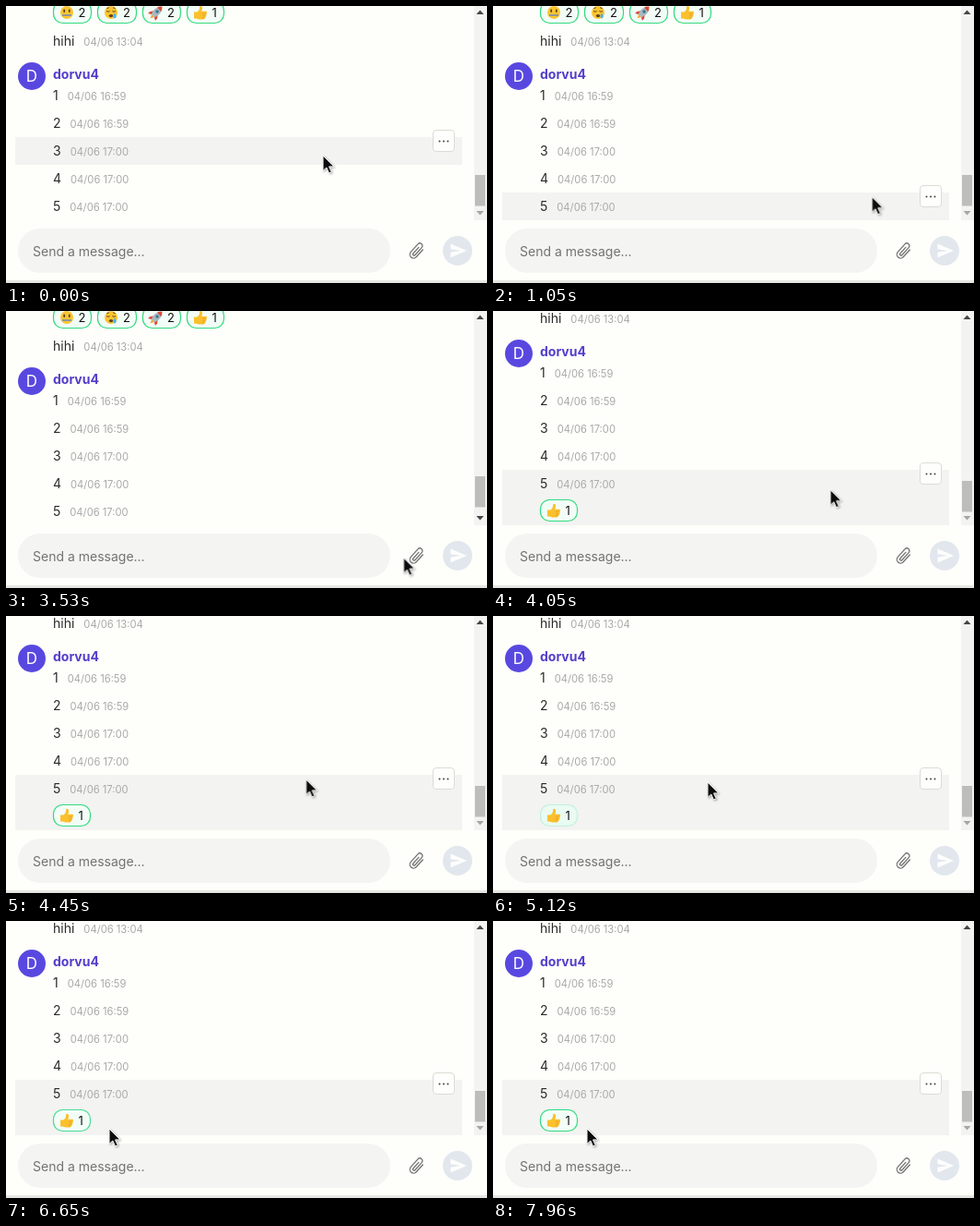
Recreate the animation shown at these times as an HTML page. Size 522 px wide and 300 px high, loop 8 s.

```html
<!DOCTYPE html>
<html lang="en">
<head>
<meta charset="utf-8">
<title>Chat reaction</title>
<style>
html, body { margin: 0; width: 100%; height: 100%; overflow: hidden; background: #fefefa; }
svg { display: block; }
#stage { width: 522px; height: 300px; font: 14px Inter, sans-serif; fill: #2b2b2b; }
.time { font-size: 11.2px; fill: #a9a9a8; }
.name { font-weight: 700; fill: #533ecb; }
.count, .item { font-size: 13px; fill: #111; }
.chip { fill: #f3fdf7; stroke: #33da80; stroke-width: 1.2; }
.hover { fill: #f3f3f1; }
.button { fill: #fefefc; stroke: #dcdcd4; }

.row3, .row4, .row5, .menu, .hand, .arrow, .scroll, .thumb, .down, .fresh, .cursor {
  animation: 8s linear infinite;
}
.row3, .row4, .row5, .hand, .arrow, .thumb, .down { animation-timing-function: step-end; }
.row3 { animation-name: row3; }
.row4 { animation-name: row4; }
.row5 { animation-name: row5; }
.menu { animation-name: menu; }
.hand { animation-name: hand; }
.arrow { animation-name: arrow; }
.scroll { animation-name: scroll; }
.thumb { animation-name: thumb; }
.down { animation-name: down; }
.fresh { animation-name: fresh; }
.cursor { animation-name: cursor; }

@keyframes row3 { 0% { opacity: 1 } 8.9%, 100% { opacity: 0 } }
@keyframes row4 { 0% { opacity: 0 } 8.9% { opacity: 1 } 12.6%, 100% { opacity: 0 } }
@keyframes row5 { 0% { opacity: 0 } 12.6% { opacity: 1 } 39.1% { opacity: 0 } 46%, 100% { opacity: 1 } }
@keyframes menu { 0%, 23.7% { opacity: 0 } 25%, 39.1% { opacity: 1 } 39.11%, 100% { opacity: 0 } }
@keyframes hand { 0% { opacity: 0 } 17.5% { opacity: 1 } 39.1%, 100% { opacity: 0 } }
@keyframes arrow { 0% { opacity: 1 } 17.5% { opacity: 0 } 39.1%, 100% { opacity: 1 } }
@keyframes scroll {
  0%, 48.1% { transform: translateY(0) }
  50%, 100% { transform: translateY(-30px) }
}
@keyframes thumb {
  0% { transform: translateY(183px) }
  41.2% { transform: translateY(179px) }
  49.2%, 100% { transform: translateY(184px) }
}
@keyframes down { 0% { fill: #a6a6a4 } 41.2% { fill: #454545 } 50%, 100% { fill: #a6a6a4 } }
@keyframes fresh {
  0%, 56% { fill: #f3fdf7; stroke: #33da80 }
  64% { fill: #e9fbf2; stroke: #bff1dc }
  83.1% { fill: #f3fdf7; stroke: #48dc96 }
  88.6%, 100% { fill: #f3fdf7; stroke: #33da80 }
}
@keyframes cursor {
  0%, 7.6% { transform: translate(344px, 162px) }
  10.6% { transform: translate(375px, 185px) }
  13.75% { transform: translate(420px, 212px) }
  16.9% { transform: translate(462px, 213px) }
  19.5%, 28.87% { transform: translate(472px, 210px) }
  31.3% { transform: translate(454px, 244px) }
  33.87%, 43.1% { transform: translate(430px, 269px) }
  44.1% { transform: translate(432px, 268px) }
  46.9% { transform: translate(392px, 213px) }
  53.1% { transform: translate(349px, 181px) }
  55.6% { transform: translate(326px, 177px) }
  64% { transform: translate(233px, 180px) }
  73.5% { transform: translate(140px, 209px) }
  78.8% { transform: translate(118px, 222px) }
  83.1%, 84.4% { transform: translate(112px, 225px) }
  88.6%, 98.6% { transform: translate(109px, 230px) }
  99.5%, 100% { transform: translate(102px, 225px) }
}
</style>
</head>
<body>
<svg id="stage" viewBox="0 0 522 300">
  <defs>
    <g id="zip">
      <circle r="7" fill="#fbc530"/>
      <path d="M-2.800-2.500v1.500M2.800-2.500v1.500" stroke="#5d4225" stroke-width="1.800" stroke-linecap="round"/>
      <path d="M-5 3H5" stroke="#858b8f" stroke-width="2"/>
      <path d="M-4.500 3H5" stroke="#c9cccb" stroke-width=".7" stroke-dasharray="1"/>
    </g>
    <g id="tear">
      <circle r="7" fill="#fbc530"/>
      <path d="M-5-1.500q2 1.500 3.600 0M1.400-1.500q2 1.500 3.600 0M-4.600-4.400l2.400-.9M4.600-4.400l-2.400-.9" fill="none" stroke="#5d4225"/>
      <ellipse cy="3.600" rx="2.200" ry="1.600" fill="#5d4225"/>
      <path d="M4 .5q3.400 5 0 6q-3-1 0-6" fill="#45b4ee"/>
    </g>
    <g id="rocket" transform="rotate(45)">
      <path d="M-2 5h4L0 9z" fill="#fba52c"/>
      <path d="M-2.500 0L-5.500 4v3L0 4l5.500 3V4L2.500 0z" fill="#dc4a38"/>
      <path d="M0-9q6 6 2.500 14h-5Q-6-3 0-9" fill="#a9b9bf"/>
      <path d="M0-9q2.700 2.300 3 4.500h-6Q-2.700-6.700 0-9" fill="#dc4a38"/>
      <circle cy="-1.500" r="1.700" fill="#3c7892"/>
    </g>
    <g id="like">
      <path d="M-7-.5h3.500C-1.500-2-.8-4-.8-6.500c0-1.300 2.900-1 2.900 1.700 0 1.500-.4 2.500-.7 3.500H5.500c2 0 2 2.300.7 2.600 1 .8.6 2.200-.5 2.400.5 1 0 2-1 2.100.2 1.200-.6 1.700-1.700 1.700H-1C-3 7.500-3.500 6.500-7 6.500z" fill="#fbc02d"/>
      <path d="M2 1.300h4M2 3.700h3.500M1.700 5.900h2.800" stroke="#e59a20" stroke-width=".7"/>
    </g>
    <g id="more">
      <rect class="button" x="463.500" y="-7.500" width="23" height="23" rx="3.500"/>
      <g fill="#444"><circle cx="470.500" cy="4.500" r="1"/><circle cx="475" cy="4.500" r="1"/><circle cx="479.500" cy="4.500" r="1"/></g>
    </g>
    <filter id="shadow" x="-20%" y="-20%" width="140%" height="150%">
      <feDropShadow dx="0" dy="2" stdDeviation="3" flood-color="#444" flood-opacity=".45"/>
    </filter>
  </defs>

  <rect width="522" height="300" fill="#fefefa"/>

  <svg width="508" height="232" overflow="hidden">
    <g class="scroll">
      <rect class="hover row3" x="10" y="142" width="485" height="30"/>
      <rect class="hover row4" x="10" y="172" width="485" height="30"/>
      <rect class="hover row5" x="10" y="202" width="485" height="60"/>

      <g class="chip">
        <rect x="51.500" y="-5" width="41" height="23.500" rx="10"/>
        <rect x="99.500" y="-5" width="42" height="23.500" rx="10"/>
        <rect x="148.500" y="-5" width="41" height="23.500" rx="10"/>
        <rect x="196.500" y="-5" width="40" height="23.500" rx="10"/>
        <rect class="fresh" x="51.500" y="234.500" width="40" height="23" rx="10"/>
      </g>
      <use href="#zip" x="66" y="7"/>
      <use href="#tear" x="114" y="7"/>
      <use href="#rocket" transform="translate(163 7)"/>
      <use href="#like" x="211" y="7"/>
      <use href="#like" x="66" y="246"/>
      <g class="count">
        <text x="78.500" y="12">2</text>
        <text x="127" y="12">2</text>
        <text x="175" y="12">2</text>
        <text x="223.500" y="12">1</text>
        <text x="78.500" y="251">1</text>
      </g>

      <text x="51" y="43">hihi<tspan class="time" dx="10">04/06 13:04</tspan></text>
      <circle cx="28" cy="76" r="15" fill="#5948e0"/>
      <text x="28" y="82" text-anchor="middle" font-size="17" style="fill:#fff">D</text>
      <text class="name" x="51" y="79">dorvu4</text>
      <text x="51" y="102">1<tspan class="time" dx="10">04/06 16:59</tspan></text>
      <text x="51" y="132">2<tspan class="time" dx="10">04/06 16:59</tspan></text>
      <text x="51" y="162">3<tspan class="time" dx="10">04/06 17:00</tspan></text>
      <text x="51" y="192">4<tspan class="time" dx="10">04/06 17:00</tspan></text>
      <text x="51" y="222">5<tspan class="time" dx="10">04/06 17:00</tspan></text>

      <use class="row3" href="#more" y="142"/>
      <use class="row4" href="#more" y="172"/>
      <use class="row5" href="#more" y="202"/>
    </g>
  </svg>

  <rect x="508" width="14" height="232" fill="#f3f3f1"/>
  <rect class="thumb" x="509" width="11" height="33.500" fill="#bdbdbc"/>
  <path d="M510.500 9h8l-4-4.500z" fill="#454545"/>
  <path class="down" d="M510.500 222h8l-4 4.500z"/>

  <rect x="13" y="241" width="404" height="48" rx="24" fill="#f4f4f2"/>
  <text x="29" y="271" fill="#737373">Send a message...</text>
  <path transform="translate(446 265) rotate(42)" d="M4-5V5.500a4 4 0 0 1-8 0V-6a2.800 2.800 0 0 1 5.600 0V5a1.300 1.300 0 0 1-2.600 0V-4" fill="none" stroke="#737373" stroke-width="1.300" stroke-linecap="round"/>
  <circle cx="490" cy="265" r="16" fill="#e2e7ee"/>
  <path d="M482.500 257.500L500 265l-17.500 7.500v-5.800l11-1.700-11-1.700z" fill="#fdfdfc"/>
  <rect y="297" width="522" height="3" fill="#e6e6e2"/>

  <g class="menu">
    <rect x="351.500" y="218" width="136" height="72.500" rx="8" fill="#fefefc" filter="url(#shadow)"/>
    <text class="item" x="364" y="243" style="fill:#ef4444">Delete</text>
    <text class="item" x="364" y="275">React with</text>
    <use href="#like" x="443" y="270"/>
  </g>

  <g class="cursor" style="filter:drop-shadow(1px 1px 1px #0005)">
    <path class="arrow" d="M0 0v16.500l3.800-3.500 2.700 6 2.800-1.200-2.700-5.900H12z" fill="#0c0c0c" stroke="#fff"/>
    <path class="hand" d="M-1.500 1q1.500-2 3 0v4.500q1.300-1.200 2.500.2 1.400-.8 2.300.5 2-.6 2.200 1.300v4L7 15.500H-.5L-4.500 9q-.3-2 1.500-1.500L-1.500 9z" fill="#0c0c0c" stroke="#fff"/>
  </g>
</svg>
</body>
</html>
```
